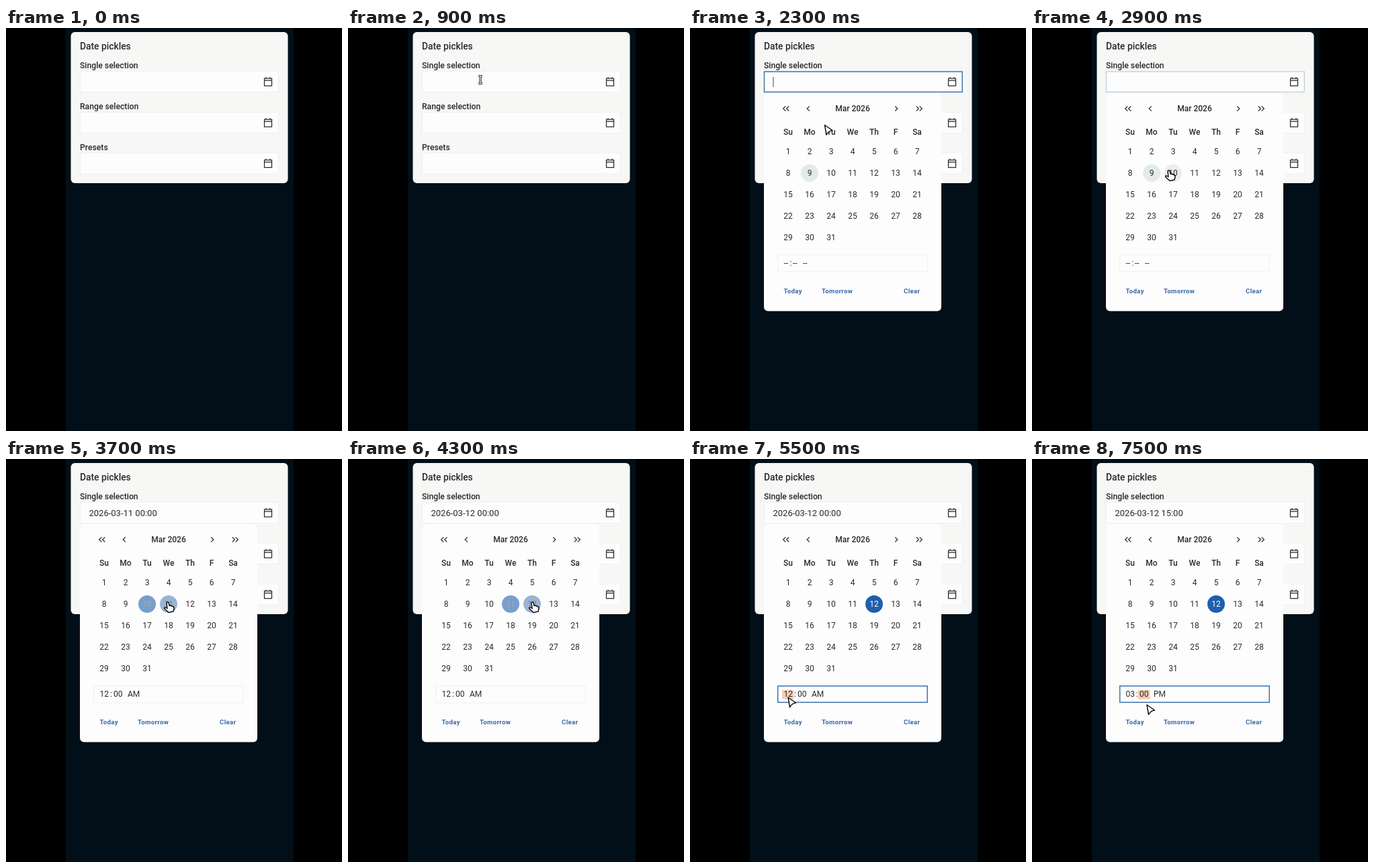
These frames come from a looping animation (500 px wide and 600 px high, 8 s). An HTML page:

```html
<!DOCTYPE html>
<html lang="en">
<head>
<meta charset="utf-8">
<title>Date picker</title>
<style>
  html, body { margin: 0; height: 100%; overflow: hidden; background: #000; }
  svg { display: block; width: 100vw; height: 100vh; }
  text { font: 12px Roboto, sans-serif; fill: #2a2a2c; white-space: pre; }
  .mid { text-anchor: middle; }
  .bold { font-weight: 500; }
  .title { font-size: 13.8px; font-weight: 500; }
  .label { font-size: 12.2px; font-weight: 500; }
  .value { font-size: 13px; }
  .link { font-size: 9.6px; font-weight: 700; letter-spacing: .35px; fill: #3568a8; }
  .field { fill: #fdfdfd; stroke: #f0f0f2; }
  .focus { fill: none; stroke: #3f74b0; stroke-width: 1.5; }
  .icon { fill: none; stroke: #2a2a2c; stroke-width: 1.25; }
  .pointer { fill: #fff; stroke: #111; stroke-width: 1.5; stroke-linejoin: round; }
</style>
</head>
<body>
<svg id="stage" viewBox="0 0 500 600"></svg>
<script>
const LOOP = 8000, FRAME = 100, FADE = 250;
const OPEN = 1200, BLUR = 2750, TIME_FOCUS = 5400;

// Selected days with the times they are picked and dropped
const picks = [
  { day: 10, on: 3000, off: 3600 },
  { day: 11, on: 3600, off: 4200 },
  { day: 12, on: 4200, off: Infinity }
];

// Pointer stops: time, x, y
const route = [
  [200, 300, 610], [900, 197, 77], [2000, 197, 77], [2600, 204, 212],
  [3200, 204, 212], [3500, 241, 213], [3900, 241, 213], [4200, 275, 213],
  [4600, 275, 213], [5300, 146, 355], [5700, 146, 355], [6100, 165, 352],
  [6300, 165, 352], [6500, 167, 366], [7400, 167, 366], [7500, 171, 366]
];

const clamp = v => Math.max(0, Math.min(1, v));
const mix = (a, b, k) => a + (b - a) * k;
const text = (x, y, s, cls = '', id = '') => `<text x="${x}" y="${y}" class="${cls}" id="${id}">${s}</text>`;
const rect = (x, y, w, h, attrs) => `<rect x="${x}" y="${y}" width="${w}" height="${h}" ${attrs}/>`;
const dayX = d => 146 + (d - 1) % 7 * 32;
const dayY = d => 184 + Math.floor((d - 1) / 7) * 32;
const days = Array.from({ length: 31 }, (_, i) => i + 1);

function pickerField(label, y) {
  return text(110, y - 4, label, 'label')
    + rect(110.5, y + .5, 295, 31, 'class="field"')
    + `<path class="icon" transform="translate(390 ${y + 16})"
        d="M-5.5-5h11V6h-11zM-5.5-2h11M-3-7v2M3-7v2"/>`;
}

function chevron(x, dir) {
  return `<path class="icon" d="M${x - 1.8 * dir} 116.4l${3.6 * dir} 3.6l${-3.6 * dir} 3.6"/>`;
}

function calendar() {
  const weekdays = ['Su', 'Mo', 'Tu', 'We', 'Th', 'F', 'Sa'];
  return rect(110, 97.5, 264, 324, 'rx="6" fill="#fdfdfd"')
    + chevron(140.5, -1) + chevron(145.5, -1) + chevron(176, -1)
    + chevron(307, 1) + chevron(338.5, 1) + chevron(343.5, 1)
    + text(242, 124.2, 'Mar 2026', 'mid bold')
    + weekdays.map((s, i) => text(146 + 32 * i, 159.2, s, 'mid bold')).join('')
    + days.map(d => `<circle id="dot${d}" cx="${dayX(d)}" cy="${dayY(d)}" r="13"/>`
        + text(dayX(d), dayY(d) + 4.2, d, 'mid', 'day' + d)).join('')
    + rect(130.5, 337.5, 222.5, 25.5, 'class="field"')
    + rect(130.7, 338, 222.5, 24.3, 'class="focus" id="timeFocus"')
    + rect(137, 344, 17.5, 13.5, 'fill="#f5ccb4" id="segment"')
    + text(139.5, 354.4, '', '', 'hour') + text(155, 354.4, ':', '', 'colon')
    + text(160, 354.4, '', '', 'minute') + text(181, 354.4, '', '', 'half')
    + text(139.5, 395.3, 'Today', 'link') + text(196, 395.3, 'Tomorrow', 'link')
    + text(318, 395.3, 'Clear', 'link');
}

const beam = 'M-3-5.5H3M0-5.5V5.5M-3 5.5H3';
document.getElementById('stage').innerHTML =
  rect(0, 0, 500, 600, 'fill="#000"')
  + rect(89, 0, 339, 600, 'fill="#020f18"')
  + rect(96.5, 6, 323, 225, 'rx="6" fill="#f7f7f6"')
  + text(110, 32, 'Date pickles', 'title')
  + pickerField('Single selection', 64)
  + pickerField('Range selection', 125)
  + pickerField('Presets', 185.5)
  + rect(110.5, 65, 294.7, 30.3, 'class="focus" id="fieldFocus"')
  + rect(123.5, 73, 1, 15, 'fill="#444" id="caret"')
  + text(123.5, 84.7, '', 'value', 'value')
  + `<g id="popup">${calendar()}</g>
  <g id="cursor">
    <path id="arrow" class="pointer" d="M0 0L2.5 14.5Q6 8.5 11.5 8Z"/>
    <path id="hand" class="pointer" d="M-2 1.5Q-1.5-.5 0 0Q1.3.5 2 5.5Q4 4.5 5 6Q7 5.5 7.5 7Q9.5 7 9 9.5L8 14L1 15.5L-4.5 10.5Q-6 9-5 8Q-4 7.5-1 9.5Z"/>
    <g id="beam" fill="none"><path d="${beam}" stroke="#222" stroke-width="3.2" stroke-linejoin="round"/><path d="${beam}" stroke="#fff" stroke-width="1.2"/></g>
  </g>`;

const el = id => document.getElementById(id);
const show = (id, on) => el(id).style.display = on ? '' : 'none';
const write = (id, s, x) => { el(id).textContent = s; el(id).setAttribute('x', x); };
const blend = (a, b, k) => `rgb(${a.map((v, i) => Math.round(mix(v, b[i], k)))})`;

function pointerAt(t) {
  const i = route.findIndex(stop => stop[0] > t);
  if (i < 0) return route[route.length - 1].slice(1);
  if (i === 0) return route[0].slice(1);
  const [t0, x0, y0] = route[i - 1], [t1, x1, y1] = route[i];
  const k = clamp((t - t0) / (t1 - t0)), ease = k * k * (3 - 2 * k);
  return [mix(x0, x1, ease), mix(y0, y1, ease)];
}

function drawPointer(t, hovered) {
  const [x, y] = pointerAt(t);
  const overField = x > 110 && x < 406 && (y > 64 && y < 96
    || t < OPEN && (y > 125 && y < 157 || y > 185 && y < 218));
  show('cursor', t >= 200);
  el('cursor').setAttribute('transform', `translate(${x} ${y})`);
  show('hand', hovered);
  show('beam', overField);
  show('arrow', !hovered && !overField);
}

function drawDays(t, hovered) {
  const paper = [253, 253, 253], today = [227, 234, 234], hover = [236, 236, 234];
  for (const d of days) {
    const pick = picks.find(p => p.day === d);
    const k = pick ? clamp((t - pick.on) / FADE) - clamp((t - pick.off) / FADE) : 0;
    const base = d === hovered ? hover : d === 9 && t < picks[0].on ? today : paper;
    el('dot' + d).style.fill = blend(base, [31, 95, 172], k);
    el('day' + d).style.fill = blend([42, 42, 44], [255, 255, 255], k);
  }
}

function drawTime(t) {
  const picked = t >= picks[0].on;
  const [hour, half, clock] = t < 5800 ? ['12', 'AM', '00'] : t < 6000 ? ['01', 'AM', '01'] : ['03', 'PM', '15'];
  write('hour', picked ? hour : '--', 139.5);
  write('colon', ':', picked ? 155 : 148.5);
  write('minute', picked ? '00' : '--', picked ? 160 : 153);
  write('half', picked ? half : '--', picked ? 181 : 168);
  show('segment', t >= TIME_FOCUS);
  el('segment').setAttribute('x', t < 6000 ? 137 : 158);
  el('timeFocus').style.opacity = clamp((t - TIME_FOCUS + 100) / 200);
  const pick = picks.find(p => t >= p.on && t < p.off);
  el('value').textContent = pick ? `2026-03-${pick.day} ${clock}:00` : '';
}

function render(now) {
  const t = Math.floor(now % LOOP / FRAME) * FRAME;
  const [x, y] = pointerAt(t);
  const hovered = t >= OPEN && days.find(d => Math.hypot(x - dayX(d), y - dayY(d)) < 14);
  show('popup', t >= OPEN);
  show('caret', t >= OPEN && t < BLUR && (t - OPEN) % 1000 < 500);
  el('fieldFocus').style.opacity = clamp((t - OPEN + 100) / 200) - clamp((t - BLUR) / 200);
  drawDays(t, hovered);
  drawTime(t);
  drawPointer(t, Boolean(hovered));
}

const start = performance.now();
function tick() {
  render(performance.now() - start);
  requestAnimationFrame(tick);
}
tick();
</script>
</body>
</html>
```
